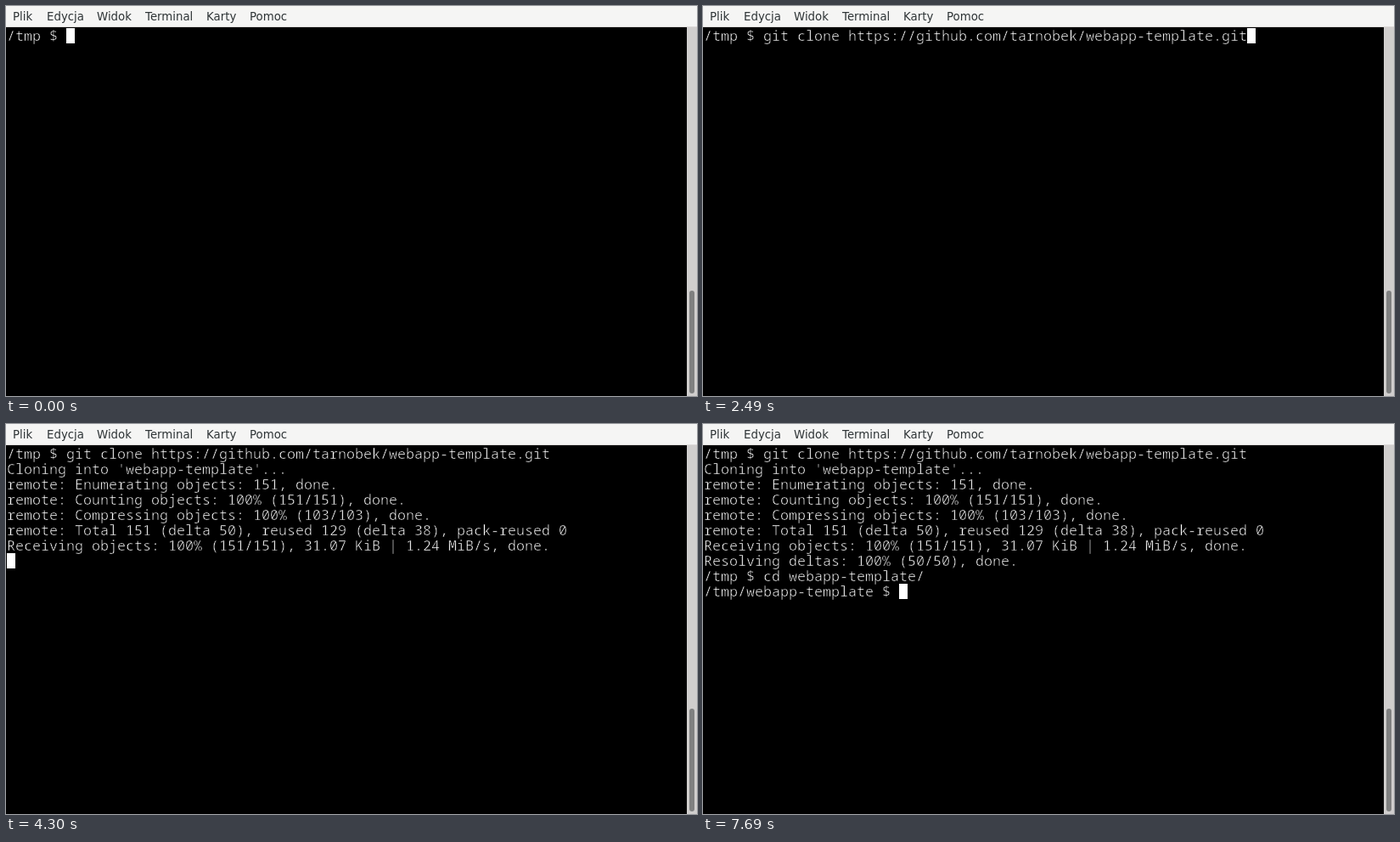
Recreate the animation shown at these times as an HTML page with a canvas. Size 814 by 459 pixels, loop 8 s.

```html
<!DOCTYPE html>
<html lang="pl">
<head>
<meta charset="utf-8">
<title>Terminal</title>
<style>
  html, body { margin: 0; width: 100%; height: 100%; overflow: hidden; background: #000; }
  canvas { display: block; }
</style>
</head>
<body>
<canvas id="stage" width="814" height="459"></canvas>
<script>
const ctx = document.getElementById('stage').getContext('2d', { alpha: false });
const LOOP = 8000;
const CELL_W = 10, CELL_H = 18, LEFT = 1, TOP = 26, BASELINE = 15;

const MENU = [['Plik', 8], ['Edycja', 48], ['Widok', 107], ['Terminal', 164], ['Karty', 236], ['Pomoc', 287]];
const PROMPT = '/tmp $ ';
const URL_TEXT = 'https://github.com/tarnobek/webapp-template.git';

// Each state holds the screen lines and the cursor cell from its time on.
const states = [];
const lines = [];

function show(time, row, col) {
  states.push({ time, lines: lines.slice(), row, col });
}

function put(time, row, text, cursorRow = row, cursorCol = text.length) {
  lines[row] = text;
  show(time, cursorRow, cursorCol);
}

function type(row, keys) {
  let text = lines[row];
  for (const [time, added] of keys) put(time, row, text += added);
}

function progress(time, row, label, done, total) {
  const percent = String(Math.floor(100 * done / total)).padStart(3);
  put(time, row, `${label}: ${percent}% (${done}/${total})`, row, 0);
}

const COUNT = 'remote: Counting objects';
const COMPRESS = 'remote: Compressing objects';
const RECEIVE = 'Receiving objects';
const RESOLVE = 'Resolving deltas';

put(0, 0, PROMPT);
type(0, [[500, 'g'], [590, 'i'], [680, 't'], [770, ' '], [1110, 'c'], [1190, 'l'], [1390, 'o'],
         [1670, 'n'], [1765, 'e'], [1860, ' '], [2490, URL_TEXT]]);

show(2860, 1, 0);
put(2960, 1, "Cloning into 'webapp-template'...", 2, 0);

lines[2] = 'remote: Enumerating objects: 151, done.';
progress(3460, 3, COUNT, 38, 151);
progress(3560, 3, COUNT, 94, 151);
lines[3] = COUNT + ': 100% (151/151), done.';
progress(3640, 4, COMPRESS, 2, 103);
progress(3720, 4, COMPRESS, 36, 103);
progress(3800, 4, COMPRESS, 81, 103);
put(3880, 4, COMPRESS + ': 100% (103/103), done.', 5, 0);
progress(3960, 5, RECEIVE, 37, 151);
lines[5] = 'remote: Total 151 (delta 50), reused 129 (delta 38), pack-reused 0';
progress(4040, 6, RECEIVE, 79, 151);
progress(4120, 6, RECEIVE, 118, 151);
progress(4200, 6, RECEIVE, 151, 151);
put(4300, 6, RECEIVE + ': 100% (151/151), 31.07 KiB | 1.24 MiB/s, done.', 7, 0);
progress(4400, 7, RESOLVE, 0, 50);
progress(4500, 7, RESOLVE, 18, 50);
progress(4600, 7, RESOLVE, 50, 50);
put(4700, 7, RESOLVE + ': 100% (50/50), done.', 8, 0);

put(4800, 8, PROMPT);
type(8, [[5630, 'c'], [5810, 'd'], [6320, ' '], [6530, 'w'], [6730, 'e'], [6900, 'bapp-template/']]);
put(7690, 9, '/tmp/webapp-template $ ');

function rect(color, x, y, w, h) {
  ctx.fillStyle = color;
  ctx.fillRect(x, y, w, h);
}

function drawWindow() {
  rect('#000', 0, 0, 814, 459);
  rect('#f5f5f4', 0, 0, 814, 24);
  rect('#dcdad8', 0, 24, 814, 1);
  rect('#d0cecd', 802, 25, 12, 434);
  ctx.fillStyle = '#7f8080';
  ctx.beginPath();
  ctx.roundRect(805, 335, 6, 121, 3);
  ctx.fill();

  ctx.font = '13.33px "DejaVu Sans", sans-serif';
  ctx.textAlign = 'left';
  ctx.fillStyle = '#2e3436';
  for (const [label, x] of MENU) ctx.fillText(label, x, 17);
}

// The outline in the background colour thins the strokes of the letter.
function drawChar(char, row, col, color, background) {
  const x = LEFT + (col + 0.5) * CELL_W;
  const y = TOP + row * CELL_H + BASELINE;
  ctx.fillStyle = color;
  ctx.fillText(char, x, y);
  ctx.strokeStyle = background;
  ctx.strokeText(char, x, y);
}

function drawScreen(state) {
  ctx.font = '300 16.667px "Noto Sans Mono", "DejaVu Sans Mono", monospace';
  ctx.textAlign = 'center';
  ctx.lineWidth = 0.5;
  ctx.lineJoin = 'round';
  state.lines.forEach((line, row) => {
    [...line].forEach((char, col) => drawChar(char, row, col, '#fff', '#000'));
  });

  const { row, col } = state;
  rect('#fff', LEFT + col * CELL_W, TOP + row * CELL_H, CELL_W, CELL_H);
  const under = (state.lines[row] || '')[col];
  if (under) drawChar(under, row, col, '#000', '#fff');
}

function draw(time) {
  drawWindow();
  drawScreen(states.findLast(state => state.time <= time));
}

const start = performance.now();
function tick() {
  draw((performance.now() - start) % LOOP);
  requestAnimationFrame(tick);
}
tick();
</script>
</body>
</html>
```
